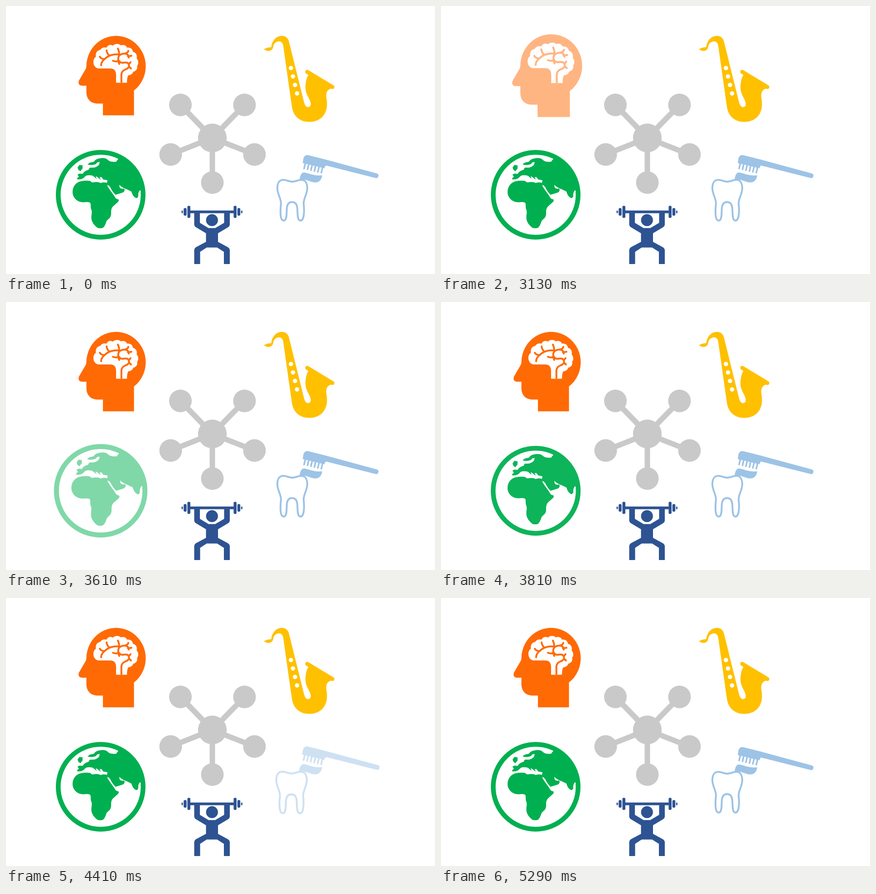
Animation, 947 px wide and 592 px high, one loop 8.1 s. Source, as an HTML page with a canvas:

```html
<!DOCTYPE html>
<html lang="en">
<head>
<meta charset="utf-8">
<title>Pulsing icons</title>
<style>
  html, body { margin: 0; width: 100%; height: 100%; overflow: hidden; background: #fff; }
  canvas { display: block; }
</style>
</head>
<body>
<canvas id="stage" width="947" height="592"></canvas>
<script>
const ctx = document.getElementById('stage').getContext('2d');
const LOOP = 8100, FIRST = 2890, LAST = 5290, STEP = 40;
const START = 2846, PULSE = 487;

const paint = (color, d) => { ctx.fillStyle = color; ctx.fill(new Path2D(d)); };

function line(color, width, d, cap = 'round') {
  ctx.strokeStyle = color;
  ctx.lineWidth = width;
  ctx.lineCap = cap;
  ctx.lineJoin = 'round';
  ctx.stroke(new Path2D(d));
}

function dot(color, x, y, r) {
  ctx.fillStyle = color;
  ctx.beginPath();
  ctx.arc(x, y, r, 0, 2 * Math.PI);
  ctx.fill();
}

function bar(color, x, y, w, h, r) {
  ctx.fillStyle = color;
  ctx.beginPath();
  ctx.roundRect(x, y, w, h, r);
  ctx.fill();
}

function network() {
  const grey = '#c9c9c9', x = 455.5, y = 291.5;
  for (const [nx, ny] of [[385, 218.5], [526.5, 218.5], [363.5, 328], [548.5, 328], [455.5, 390]]) {
    line(grey, 12, `M${x} ${y}L${nx} ${ny}`, 'butt');
    dot(grey, nx, ny, 25);
  }
  dot(grey, x, y, 31.7);
}

function head(c) {
  paint(c, `M214 241.5H282.5V186.5A65.5 67 0 1 0 177.5 133Q177.5 136 176 139L162 163
    C158 170 161 176 168 176H177.5V190C177.5 206 187 215.5 203 215.5H214Z`);
  paint('#fff', `M243 169.5V153C243 143 239 138 230 138H206C197 138 192.500 130 193 123
    C193 117 196 114 198.500 112C197 104 201 98 208 97C211 92 217 90.500 222 92
    C225 85 232 85 236 87.500C241 82 250 83 254 87C260 84 266 88 267 92
    C274 91 280 95 280 101C288 103 290 110 288.500 116C293 121 293 128 289.500 132
    C291 139 287 144 281 145C279 151 274 153 270 153Q267 158 267 169.500Z`);
  line(c, 4, `M254.700 169.500V152C254.700 145 259 142 264 140Q270 138 271 134`, 'butt');
  line(c, 4, `M210 131Q210 123 218 117Q226 109 237 107.500Q244 106 251 108
    M207 112Q210 117 217 117.500M222 98Q223 106 229 110M247 94Q250 100 250 107
    M270 99Q269 104 262 105M236 121Q244 124 247 121L250 128
    M271 114Q271 107 263 105Q253 105 249 111Q246 117 250 122Q254 127 260 125
    M261 125Q269 124 271 129Q271 135 276 138M269 111L277 110M271 129L275 124`);
}

function globe(c) {
  ctx.strokeStyle = c;
  ctx.lineWidth = 10.5;
  ctx.beginPath();
  ctx.arc(209, 417, 93.7, 0, 2 * Math.PI);
  ctx.stroke();
  // Africa
  paint(c, `M147 411C147 398 155 389 166 387Q177 385 186 386.500Q189 391 195 389
    Q204 388 209 391Q216 388 224 391V398Q231 409 238 418Q242 427 248 427Q250 430 247 433
    L238 441C232 446 232 451 232 459C232 468 225 471 222 475C220 481 218 487 214 490
    Q208 492 202 490C195 485 189 477 188.500 469C188 461 191 455 188 449
    C186 444 188 439 186 435Q183 432 172 433.500C157 434 147 423 147 411Z`);
  // Europe and Asia
  paint(c, `M157 383Q157 379 161 377L158 373Q160 369 169 371Q173 364 182 362L185 357H192
    Q199 357 205 351L207 345Q201 344 199 349Q190 353 180 350L185 346L194 344
    Q198 337 210 336Q221 335 226 341Q231 345 243 344L250 335A92 92 0 0 1 301 406L296 407
    Q291 411 292 420Q289 427 285 423Q279 419 277 410L267 405Q257 402 250 395L251 401
    Q255 405 260 403Q265 407 258 412L242 417Q235 411 230 400L226 396L222 395L224 385
    L214 383Q212 377 207 378L209 384L202 378L198 376L200 382L192 375Q180 372 175 376
    Q170 384 157 383Z`);
  paint(c, 'M158 357L162 351L169 352V359L164 365L160 362Z');
}

function lifter(c) {
  const mid = 454.7;
  line(c, 6, `M405 454.700H504`, 'butt');
  for (const side of [-1, 1]) {
    const plate = (d, w, h) => bar(c, mid + side * d - w / 2, 454.7 - h / 2, w, h, Math.min(3, w / 2));
    plate(51, 6.5, 27);
    plate(59.3, 6.5, 17);
    plate(65.7, 3, 6);
  }
  dot(c, mid, 473, 13.2);
  paint(c, `M415.500 456H428V479L447 490.500H462L481.500 479V456H494V482Q494 486 490.500 488.500
    L468 502V521L490 533Q494 535.500 494 540V570H481V543L466 533.500H443L428.500 543V570H415.500V540
    Q415.500 535.500 419 533L441.500 521V502L419 488.500Q415.500 486 415.500 482Z`);
}

function tooth(c) {
  paint(c, `M655 347L656.500 337Q659 328 667 329.500L705 339L819 370Q823 371.500 822 376
    Q821 381 816 380L707 352.500Q704 353 703 358.500Z`);
  for (let i = 0; i < 6; i++) {
    const x = 658 + i * 7.6, y = 359 + i * 1.85;
    line(c, 3.6, `M${x + 3} ${y - 13}L${x} ${y}`);
  }
  paint(c, `M648 384.500C649 375 652 366 660 368C673 371 683 376 698 374
    C697 385 690 391 680 389.500C668 388 662 381 648 384.500Z`);
  line(c, 4, `M632 388C625 388 619 384 612 384C603 384 599 392 599 402C599 416 607 424 607 436
    C605 455 605 474 613 474C621 474 619 455 620 446C621 437 625 433 631.500 433
    C638 433 642 437 643 446C644 455 642 474 650 474C658 474 659 455 657 436
    C657 424 665 416 665 402C665 392 661 384 652 384C645 384 639 388 632 388Z`);
}

function sax(c) {
  paint(c, `M569.500 95Q578 91 585.500 91C587 77 596 66 609 66C618 66 623 71 625 80L658 213
    C660 220 663 223.500 667 223.500C672 223 674 218 672 212C669 202 661 194 661 180
    C661 167 664 158 668 151L719 182C710 184 706 190 707 201Q709 210 708.500 220
    C707 243 691 256 669.500 256C648 256 634 243 631 222L612 88C611 81 607 78 602 78
    C594 79 590 85 589.500 92C587 100 577 102 569.500 95Z`);
  line(c, 9, 'M665 145.500L720.500 179');
  for (let i = 0; i < 4; i++) dot('#fff', 629 + i * 4.5, 137 + i * 18.7, 4.8);
}

// Icons in pulse order: drawing, colour, centre of scaling
const icons = [
  [head, [255, 106, 4], 234.5, 153.7],
  [globe, [0, 176, 80], 209, 417],
  [lifter, [46, 83, 146], 454.7, 506],
  [tooth, [157, 195, 230], 709.5, 402.5],
  [sax, [255, 192, 0], 647, 161]
];

function render(ms) {
  const t = ms % LOOP;
  const now = t < FIRST || t >= LAST ? 0 : FIRST + STEP * Math.floor((t - FIRST) / STEP);
  ctx.fillStyle = '#fff';
  ctx.fillRect(0, 0, 947, 592);
  network();
  icons.forEach(([draw, rgb, x, y], i) => {
    const p = Math.min(1, Math.max(0, (now - START) / PULSE - i));
    const edge = Math.min(p, 1 - p);
    const fade = Math.min(0.5, edge * 2.5);
    const scale = 1 + 0.1 * edge;
    ctx.save();
    ctx.translate(x, y);
    ctx.scale(scale, scale);
    ctx.translate(-x, -y);
    draw(`rgb(${rgb.map(v => Math.round(v + (255 - v) * fade))})`);
    ctx.restore();
  });
}

const origin = performance.now();
function tick() {
  render(performance.now() - origin);
  requestAnimationFrame(tick);
}
tick();
</script>
</body>
</html>
```
